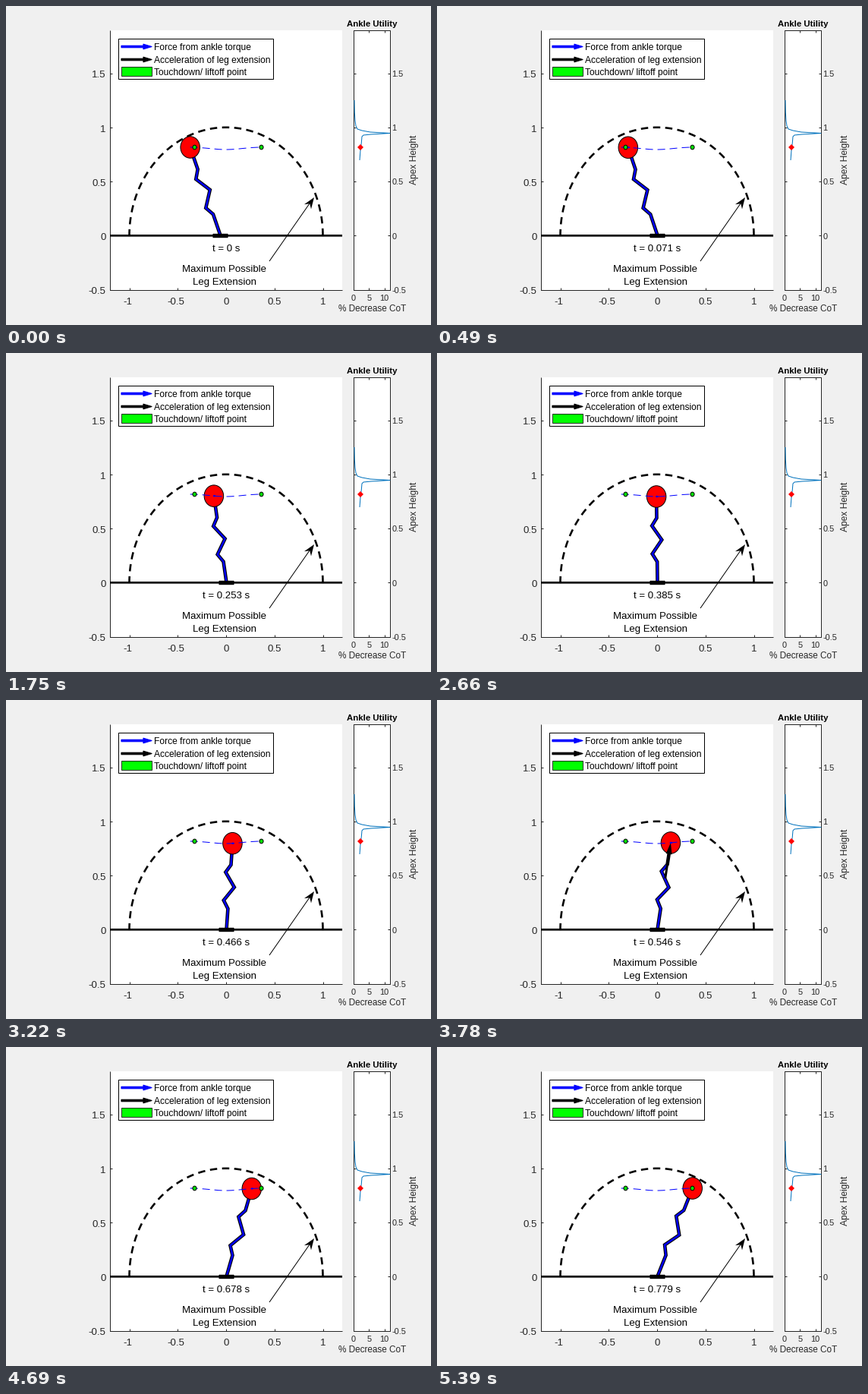
A matplotlib script that plays this animation: 560 px wide and 420 px high, repeating every 5.46 s.

```python
import numpy as np
import matplotlib.pyplot as plt
from matplotlib.animation import FuncAnimation
from matplotlib.patches import Ellipse, Polygon, Rectangle

FRAMES, INTERVAL = 78, 70
DT = 0.01012
PX = 0.72  # points per pixel at 100 dpi
GRAY = "#262626"
BLUE = "#0000ff"

plt.rcParams["font.family"] = "Liberation Sans"
fig = plt.figure(figsize=(5.6, 4.2), dpi=100, facecolor="#f0f0f0")
ax = fig.add_axes([0, 0, 1, 1])
ax.set_xlim(0, 560)
ax.set_ylim(420, 0)
ax.axis("off")


def sx(x):
    return 290 + 127.5 * x


def sy(y):
    return 302.3 - 142.5 * y


def line(xs, ys, color="k", width=1.0, z=2, **kw):
    kw.setdefault("solid_capstyle", "butt")
    return ax.plot(xs, ys, color=color, lw=width * PX, zorder=z, **kw)[0]


def text(x, y, s, size, color="k", ha="center", **kw):
    return ax.text(x, y, s, fontsize=size * PX, color=color, ha=ha,
                   va="baseline", zorder=9, **kw)


def box(x0, y0, x1, y1, face="w", edge="none", z=1, width=1.0):
    ax.add_patch(Rectangle((x0, y0), x1 - x0, y1 - y0, fc=face, ec=edge,
                           lw=width * PX, zorder=z))


def oval(x, y, r, face, z):
    e = Ellipse((x, y), 255 * r, 285 * r, fc=face, ec="k", lw=PX, zorder=z)
    return ax.add_patch(e)


def arrow_shape(tail, tip, shaft=3, head=9, length=14):
    tail, tip = np.array(tail, float), np.array(tip, float)
    u = (tip - tail) / max(np.hypot(*(tip - tail)), 1e-6)
    v = np.array([-u[1], u[0]])
    neck = tip - u * length
    s, h = v * shaft / 2, v * head / 2
    return np.array([tail + s, neck + s, neck + h, tip,
                     neck - h, neck - s, tail - s])


def body_at(n):
    d = n - 38.5
    return (289.7 + 1.165 * d + 3.77e-5 * d ** 3,
            186 + 3 * np.cos(np.pi * d / 77) ** 2)


def leg_points(foot, body):
    """Zigzag spring between foot and body, both in pixels."""
    scale = np.array([127.5, -142.5])
    span = (np.array(body) - foot) / scale
    side = np.array([span[1], -span[0]]) / np.hypot(*span)
    along = np.array([0, 0.24, 0.333, 0.495, 0.66, 0.75, 1])
    across = np.array([0, 0, -0.05, 0.05, -0.05, 0, 0])
    return foot + (along[:, None] * span + across[:, None] * side) * scale


def draw_main():
    box(137, 32, 443, 374)
    line([137, 137, 443], [32, 374, 374], GRAY)
    for v in (-1, -0.5, 0, 0.5, 1):
        line([sx(v)] * 2, [374, 371], GRAY)
        text(sx(v) - (2 if v < 0 else 0), 393, f"{v:g}", 13.3, GRAY)
    for v in (-0.5, 0, 0.5, 1, 1.5):
        line([137, 140], [sy(v)] * 2, GRAY)
        text(131.5, sy(v) + 5.9, f"{v:g}", 13.3, GRAY, "right")

    a = np.linspace(0, np.pi, 300)
    line(sx(np.cos(a)), sy(np.sin(a)), "k", 2.6, 2,
         dashes=(9.5 / 2.6, 6.5 / 2.6), dash_capstyle="butt")
    line([137, 443], [sy(0)] * 2, "k", 2.7, 3, snap=False)

    text(288, 350, "Maximum Possible", 13.3)
    text(288, 367, "Leg Extension", 13.3)
    line([347, 400], [336, 260], "k", 1)
    tip = np.array([406, 252])
    u = np.array([58, -84]) / np.hypot(58, 84)
    v = np.array([-u[1], u[0]])
    barb = [tip, tip - 15 * u + 5.5 * v, tip - 10 * u, tip - 15 * u - 5.5 * v]
    ax.add_patch(Polygon(barb, fc="k", lw=0, zorder=4))


def draw_legend():
    box(148, 43, 352, 96, "w", "k", 6)
    rows = [(53.5, BLUE, "Force from ankle torque"),
            (70.5, "k", "Acceleration of leg extension")]
    for y, color, label in rows:
        shape = arrow_shape((152, y), (192, y), 2.4, 6.5, 11)
        ax.add_patch(Polygon(shape, fc=color, ec=color, lw=1.2 * PX,
                             joinstyle="round", zorder=7))
        text(195, y + 4.5, label, 12, "k", "left")
    box(152, 80, 192, 92, "#00ff00", "k", 7, 0.8)
    text(195, 91, "Touchdown/ liftoff point", 12, "k", "left")


def draw_utility():
    box(458, 32, 506, 374, "w", GRAY)
    for v in (0, 5, 10):
        x = 458 + 4.05 * v
        line([x, x], [374, 371], GRAY)
        line([x, x], [32, 35], GRAY)
        text(x, 388, str(v), 11, GRAY)
    for v in (-0.5, 0, 0.5, 1, 1.5):
        line([506, 503], [sy(v)] * 2, GRAY)
        line([458, 461], [sy(v)] * 2, GRAY)
        text(508.5, sy(v) + 4.3, f"{v:g}", 11, GRAY, "left")
    curve = np.array([(459, 124), (459.3, 140), (460, 151), (461, 158),
                      (463, 162), (469, 164), (480, 166), (506, 167.5),
                      (481, 169), (471, 170), (469, 172), (468.3, 180),
                      (467, 190), (466, 203)])
    line(curve[:, 0], curve[:, 1], "#0072bd", 1, 3)
    diamond = [(467, 182), (471, 186), (467, 190), (463, 186)]
    ax.add_patch(Polygon(diamond, fc="r", lw=0, zorder=4))
    text(482.5, 27, "Ankle Utility", 11.4, weight="bold")
    text(482.5, 402, "% Decrease CoT", 11.7, GRAY)
    ax.text(537.5, 202.5, "Apex Height", fontsize=12 * PX, color=GRAY,
            rotation=90, ha="center", va="center")


draw_main()
draw_legend()
draw_utility()

px, py = body_at(np.linspace(0, 77, 150))
line(px, py, BLUE, 1, 7, dashes=(10, 6), dash_capstyle="butt")
for x in (248.5, 336.5):
    oval(x, 186, 0.02, "#00e000", 8)

leg_edge = line([], [], "k", 4.6, 4, solid_joinstyle="miter")
leg_core = line([], [], BLUE, 2.4, 4.1, solid_joinstyle="miter")
foot_bar = line([], [], "k", 5.4, 5)
body = oval(0, 0, 0.1, "r", 6)
push = ax.add_patch(Polygon(np.zeros((7, 2)), fc="k", lw=0, zorder=7.5))
torque = ax.add_patch(Polygon(np.zeros((7, 2)), fc=BLUE, lw=0, zorder=7.6))
clock = text(289.7, 323, "", 13.3)


def update(n):
    bx, by = body_at(n)
    fx = min(290, 282 + 1.3 * n)
    foot = np.array([fx + 0.5, 302])
    pts = leg_points(foot, (bx, by))
    leg_edge.set_data(pts[:, 0], pts[:, 1])
    leg_core.set_data(pts[:, 0], pts[:, 1])
    foot_bar.set_data([fx - 10, fx + 10], [302, 302])
    body.center = (bx, by)

    # leg push: a smooth burst after midstance, then one kick at liftoff
    hip = np.array([bx, by])
    u = (hip - foot) / np.hypot(*(hip - foot))
    size = 47.5 * max(0, 1 - ((n - 54) / 8) ** 2)
    kick = n == 76
    push.set_visible(kick or size > 3)
    if kick:
        push.set_xy(arrow_shape(hip, hip + 50.5 * u, 3, 8, 15))
    else:
        push.set_xy(arrow_shape(hip - size * u, hip, 3, 8, min(15, size)))

    torque.set_visible(5 < n < 77)
    torque.set_xy(arrow_shape((bx - 1, by), (bx + 3, by), 1.5, 3, 3))
    clock.set_text(f"t = {round(n * DT, 3):g} s")
    return leg_edge, leg_core, foot_bar, body, push, torque, clock


anim = FuncAnimation(fig, update, frames=FRAMES, interval=INTERVAL,
                     repeat=True, repeat_delay=0, blit=False)
plt.show()
```
